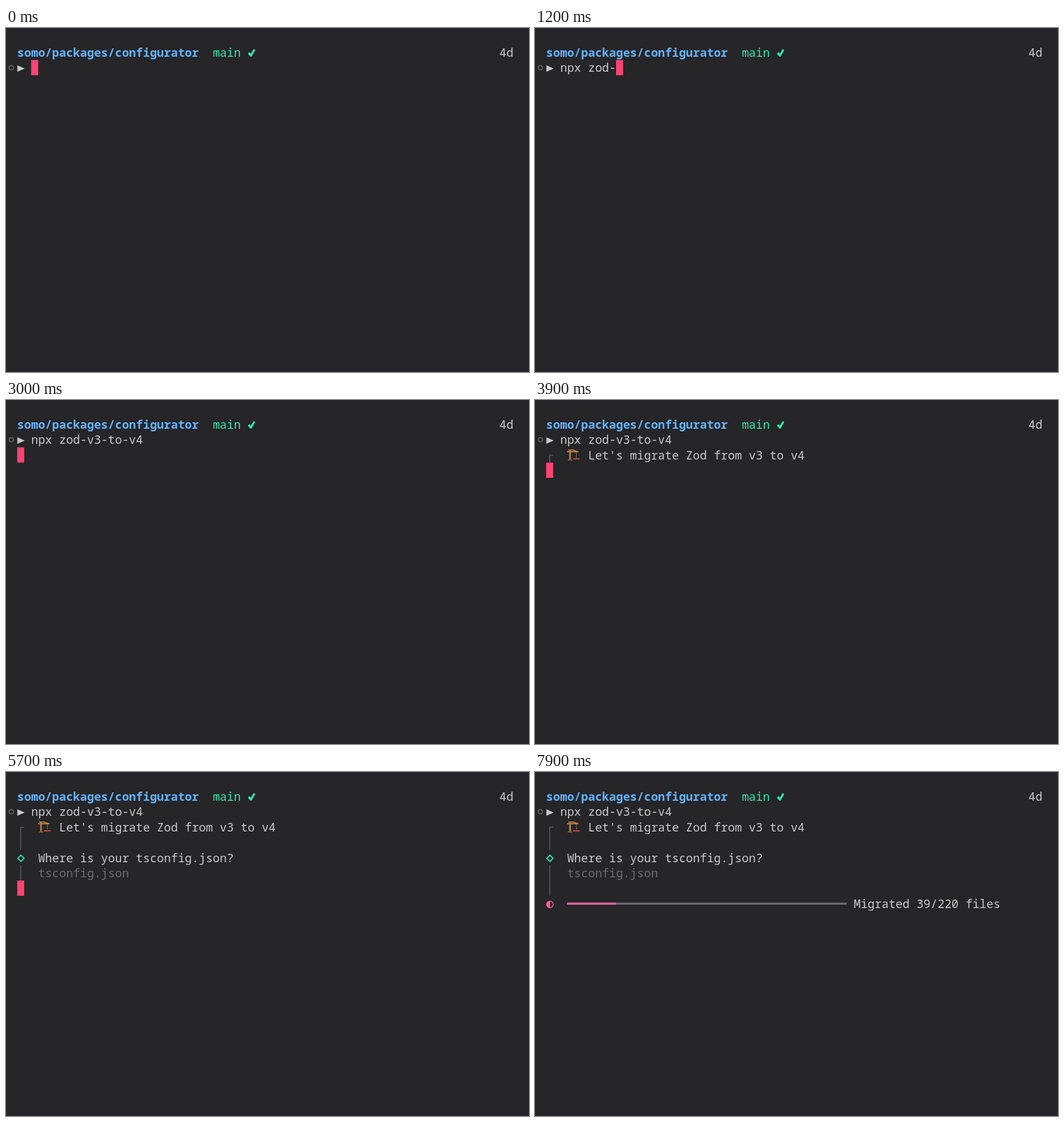
Animation of 800x526 px, one loop 8 s. Source, as an HTML page:

```html
<!DOCTYPE html>
<html lang="en">
<head>
<meta charset="utf-8">
<title>Terminal session</title>
<style>
  html, body { margin: 0; width: 100%; height: 100%; overflow: hidden; background: #262528; }
  svg { display: block; width: 800px; height: 526px; }
  text { font: 17.82px "Noto Sans Mono", "Liberation Mono", monospace; fill: #cacaca; white-space: pre; }
  .path { font-weight: 700; fill: #62b5ff; }
  .branch { fill: #2eeab5; }
  .dim { fill: #6d6c6f; }
  .rail { fill: none; stroke: #605f62; stroke-width: 1.3; }
  .active { fill: none; stroke: #62cdea; stroke-width: 1.3; }
</style>
</head>
<body>
<svg viewBox="0 0 800 526">
  <rect width="800" height="526" fill="#262528"/>

  <g id="prompt">
    <path d="M370 39.2L372.4 36.8L374.5 39.4L378.7 32.2L381.3 33.4L375.6 43.8H373.8Z" fill="#2eeab5"/>
    <circle cx="8" cy="60.8" r="3.3" fill="none" stroke="#69686b" stroke-width="1.3"/>
    <path d="M17.4 57L28.6 62L17.4 67Z" fill="#cacaca"/>
  </g>

  <g id="intro" data-from="3800">
    <path class="rail" d="M28 84.3H22.5V96"/>
    <g fill="none">
      <path d="M53.6 92V76" stroke="#a9743a" stroke-width="3"/>
      <path d="M49 79.2H66.5M51 76.5H58L66 79" stroke="#bd8440" stroke-width="1.7"/>
      <path d="M63.4 80V88" stroke="#77706b" stroke-width="1"/>
      <path d="M50 91.8H57" stroke="#80603f" stroke-width="1.6"/>
      <path d="M58 90H68.3" stroke="#a8433d" stroke-width="2.4"/>
    </g>
  </g>

  <g id="ask" data-from="4100">
    <path class="rail" d="M22.5 96V119"/>
  </g>
  <g id="editing" data-from="4100" data-to="5200">
    <path d="M22.8 126.4L28.4 132L22.8 137.6L17.2 132Z" fill="#62cdea"/>
    <path class="active" d="M22.5 142.6V166M22.5 166V177.8H28"/>
    <rect x="188.2" y="142.6" width="10.7" height="23.4" fill="#cacaca"/>
  </g>
  <g id="answer" data-from="5200">
    <path d="M22.8 127.2L27.6 132L22.8 136.8L18 132Z" fill="none" stroke="#2eeab5" stroke-width="1.7"/>
    <path class="rail" d="M22.5 142.6V166"/>
  </g>

  <g id="progress" data-from="6500">
    <path class="rail" d="M22.5 166V189"/>
    <g id="spinner" fill="#ff5fa5">
      <circle cx="22.8" cy="202.5" r="5" fill="none" stroke="#ff5fa5" stroke-width="1.3"/>
      <path d="M17.8 202.5A5 5 0 0 0 27.8 202.5Z"/>
    </g>
    <rect x="49.2" y="199.8" width="427.6" height="3" fill="#716d73"/>
    <rect id="bar" x="49.2" y="199.8" height="3" fill="#ff5fa5"/>
  </g>

  <rect id="cursor" width="10.7" height="23.2" fill="#ff4273"/>
</svg>
<script>
  const LOOP = 8000, CELL = 10.69, LINE = 23.4, LEFT = 17.1, TOP = 25.6;
  const COMMAND = "npx zod-v3-to-v4";
  const KEYS = [300, 400, 500, 600, 800, 900, 1000, 1200,
                1300, 1400, 1500, 1700, 1800, 1900, 2000, 2100];
  const ENTER = 2500, INTRO = 3800, ASK = 4100, ANSWER = 5200, MIGRATE = 6500;
  const FILES = 220, BAR_CELLS = 40;

  const $ = id => document.getElementById(id);
  const colX = col => LEFT + col * CELL;
  const rowY = row => TOP + row * LINE;

  function write(group, col, row, str, cls = "") {
    const el = document.createElementNS("http://www.w3.org/2000/svg", "text");
    el.setAttribute("x", colX(col));
    el.setAttribute("y", rowY(row) + 18.4);
    el.setAttribute("class", cls);
    el.textContent = str;
    $(group).append(el);
    return el;
  }

  write("prompt", 0, 0, "somo/packages/configurator", "path");
  write("prompt", 28, 0, "main", "branch");
  write("prompt", 69, 0, "4d");
  const typed = write("prompt", 2, 1, "");
  write("intro", 6, 2, "Let's migrate Zod from v3 to v4");
  write("ask", 3, 4, "Where is your tsconfig.json?");
  write("editing", 3, 5, "tsconfig.json");
  write("answer", 3, 5, "tsconfig.json", "dim");
  const status = write("progress", 44, 7, "");

  const timed = [...document.querySelectorAll("[data-from]")];

  function cursorCell(t, count) {
    if (t < ENTER) return [2 + count, 1];
    if (t < INTRO) return [0, 2];
    if (t < ASK) return [0, 3];
    return t >= ANSWER && t < MIGRATE ? [0, 6] : null;
  }

  function render(t) {
    for (const el of timed) {
      const { from, to = LOOP } = el.dataset;
      el.style.display = t >= from && t < to ? "" : "none";
    }

    const count = KEYS.filter(k => k <= t).length;
    typed.textContent = COMMAND.slice(0, count);

    const cell = cursorCell(t, count), cursor = $("cursor");
    cursor.style.display = cell ? "" : "none";
    if (cell) {
      cursor.setAttribute("x", colX(cell[0]));
      cursor.setAttribute("y", rowY(cell[1]));
    }

    const done = Math.max(0, Math.floor(7.1 + (t - 6700) * 32 / 1200));
    status.textContent = `Migrated ${done}/${FILES} files`;
    $("bar").setAttribute("width", Math.floor(done / FILES * BAR_CELLS) * CELL);
    const turn = Math.floor((t - 6695) / 92);
    $("spinner").setAttribute("transform", `rotate(${turn * 90} 22.8 202.5)`);
  }

  function tick() {
    render(performance.now() % LOOP);
    requestAnimationFrame(tick);
  }
  tick();
</script>
</body>
</html>
```
